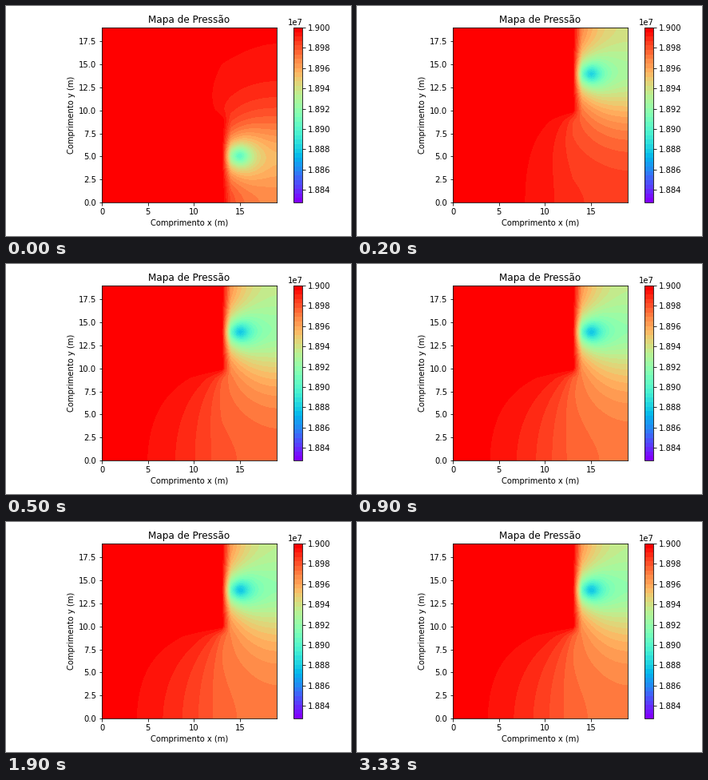
A matplotlib script for the animation above (4.43 s loop, 432x288 px).

```python
import matplotlib.pyplot as plt
import numpy as np
from matplotlib.animation import FuncAnimation
from matplotlib.cm import ScalarMappable
from matplotlib.colors import Normalize

WIDTH, HEIGHT, DPI = 432, 288, 72
LOOP_MS, FRAMES, STEP_MS = 4430, 133, 100
INTERVAL = LOOP_MS / FRAMES
LAST_STEP = 25

SIZE, REFINE = 19, 3            # reservoir side in metres, grid cells per metre
N = SIZE * REFINE + 1
P_MAX, P_MIN = 1.9e7, 1.88275e7
WELL_X, WELL_Y, WELL_RADIUS = 14.95, 13.95, 0.5
BLOCK_X, BLOCK_Y = 13, 10       # corner of the constant pressure block
TIME_STEP = 26
WALL_DROP = 0.465               # final drop right of the well, share of the range

axis = np.linspace(0, SIZE, N)
grid_x, grid_y = np.meshgrid(axis, axis)


def permeability(x, y, right, left):
    """Right and left rock, with a tight skin one metre around the block."""
    rock = np.where(x < BLOCK_X, left, right)
    skin = (x < BLOCK_X + 1) & (y > BLOCK_Y - 1)
    return np.where(skin, 0.45, rock)


def flow_matrix():
    index = np.arange(N * N).reshape(N, N)
    half = 0.5 / REFINE
    across = permeability(grid_x[:, :-1] + half, grid_y[:, :-1], 1.3, 0.5)
    along = permeability(grid_x[:-1], grid_y[:-1] + half, 1.0, 0.8)
    flow = np.zeros((N * N, N * N))
    for first, second, perm in ((index[:, :-1], index[:, 1:], across),
                                (index[:-1], index[1:], along)):
        a, b, k = first.ravel(), second.ravel(), perm.ravel()
        flow[a, a] += k
        flow[b, b] += k
        flow[a, b] -= k
        flow[b, a] -= k
    return flow * REFINE ** 2


def simulate():
    """Implicit pressure diffusion towards one well; returns a field per step."""
    eps = 1e-9
    block = (grid_x < BLOCK_X + eps) & (grid_y > BLOCK_Y - eps)
    free = np.flatnonzero(~(block | (grid_x == 0)))
    flow = flow_matrix()[np.ix_(free, free)]
    inverse = np.linalg.inv(np.eye(len(free)) + TIME_STEP * flow)

    distance2 = (grid_x - WELL_X) ** 2 + (grid_y - WELL_Y) ** 2
    source = np.exp(-distance2 / (2 * WELL_RADIUS ** 2)).ravel()[free]

    drop = np.zeros(len(free))
    fields = []
    for _ in range(LAST_STEP + 1):
        drop = inverse @ (drop + TIME_STEP * source)
        field = np.zeros(N * N)
        field[free] = drop
        fields.append(field.reshape(N, N))
    wall = fields[-1][round(WELL_Y * REFINE), -1]
    scale = WALL_DROP * (P_MAX - P_MIN) / wall
    pressures = [P_MAX - scale * field for field in fields]
    pressures[0] = pressures[0][::-1]   # the first map is drawn upside down
    return pressures


pressures = simulate()
levels = np.linspace(P_MIN, P_MAX, 40)
middles = (levels[:-1] + levels[1:]) / 2
norm = Normalize(middles[0], middles[-1])


def add_axes(left, bottom, width, height):
    return fig.add_axes([left / WIDTH, bottom / HEIGHT,
                         width / WIDTH, height / HEIGHT])


fig = plt.figure(figsize=(WIDTH / DPI, HEIGHT / DPI), dpi=DPI, facecolor="white")
ax = add_axes(120, 41.97, 219, 219)
ax.set(title="Mapa de Pressão", xlabel="Comprimento x (m)",
       ylabel="Comprimento y (m)", xlim=(0, SIZE), ylim=(0, SIZE),
       xticks=np.arange(0, 16, 5), yticks=np.arange(0, 18, 2.5),
       facecolor="red")

bar_ax = add_axes(360.4, 41.97, 10.95, 219)
bar = fig.colorbar(ScalarMappable(norm, "rainbow"), cax=bar_ax,
                   boundaries=levels, values=middles,
                   ticks=np.arange(18840000, 19000001, 20000))
bar.minorticks_off()

shown = {"step": None, "contour": None}


def update(frame):
    step = min(int((frame * INTERVAL + 2) // STEP_MS), LAST_STEP)
    if step != shown["step"]:
        if shown["contour"] is not None:
            shown["contour"].remove()
        shown["contour"] = ax.contourf(axis, axis, pressures[step],
                                       levels=levels, cmap="rainbow", norm=norm)
        shown["step"] = step
    return [shown["contour"]]


animation = FuncAnimation(fig, update, frames=FRAMES, interval=INTERVAL,
                          init_func=lambda: update(0), repeat=True,
                          repeat_delay=0, blit=False)
plt.show()
```
